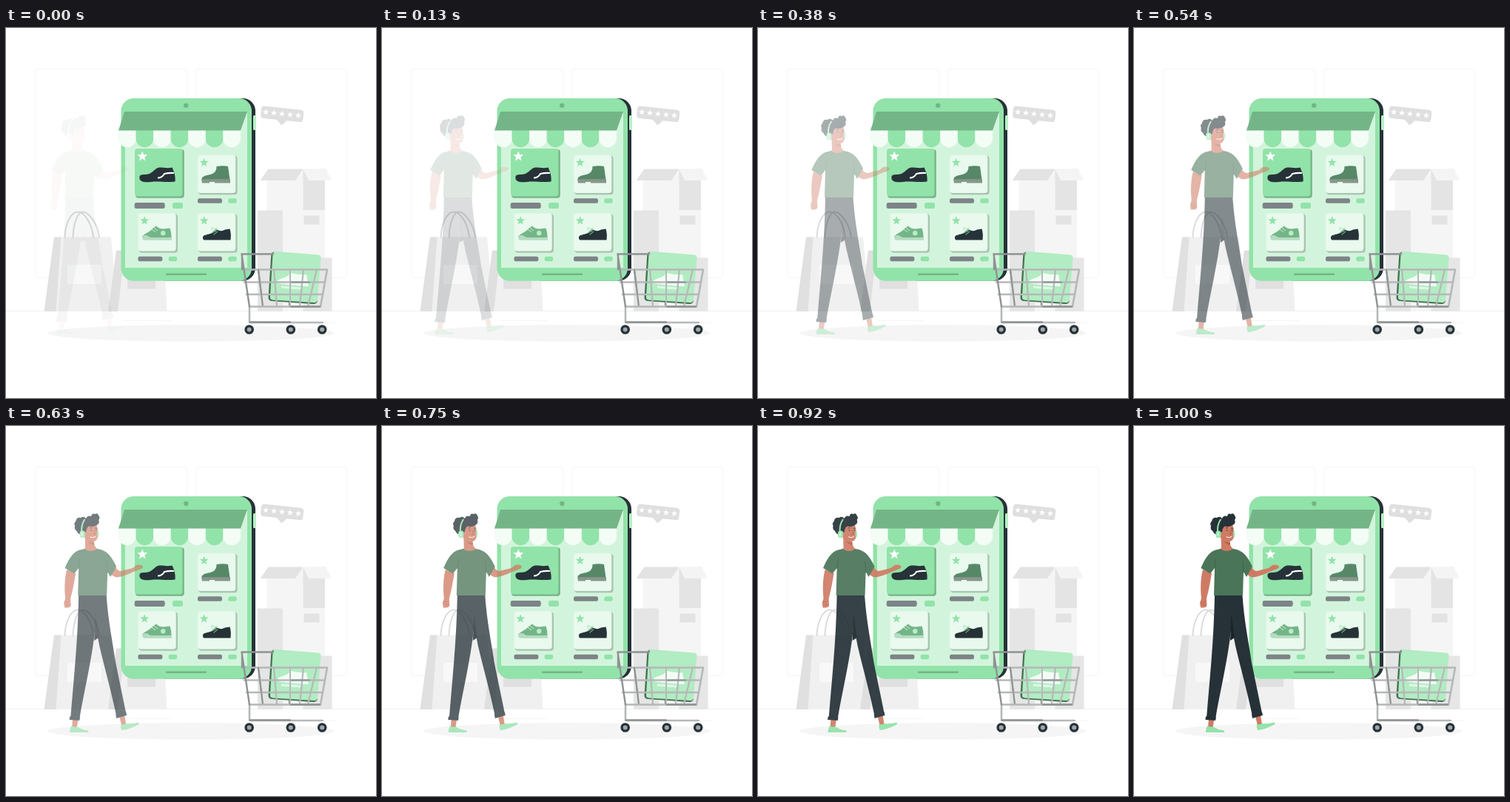
These frames come from a looping animation (500 by 500 pixels, 1.04 s). An HTML page:

```html
<!DOCTYPE html>
<html lang="en">
<head>
<meta charset="utf-8">
<title>Shopping</title>
<style>
html, body { margin: 0; width: 100%; height: 100%; overflow: hidden; background: #fff; }
svg { display: block; width: 100vw; height: 100vh; }
.line { fill: none; stroke-linecap: round; stroke-linejoin: round; }
</style>
</head>
<body>
<svg viewBox="0 0 500 500">
  <defs>
    <path id="star" d="M0-1 .25-.34 .95-.31 .4.13 .59.81 0 .42-.59.81-.4.13-.95-.31-.25-.34Z"/>
  </defs>

  <!-- room -->
  <g fill="none" stroke="#f5f5f5">
    <rect x="39.5" y="55.5" width="205" height="282" rx="3"/>
    <rect x="256.5" y="55.5" width="204" height="282" rx="3"/>
  </g>
  <path d="M0 382.5H500" stroke="#ebebeb" stroke-width=".7"/>
  <path d="M160 395.5H224M420 398.5H447" stroke="#f3f3f3" stroke-width=".8"/>
  <ellipse cx="250" cy="412.4" rx="193.5" ry="11.3" fill="#f5f5f5"/>

  <!-- paper bags -->
  <path d="M74 282.5H142L151 383H67Z" fill="#f0f0f0"/>
  <path d="M65 282.5H74.5L67.5 383H51.5Z" fill="#e0e0e0"/>
  <rect x="83" y="320" width="46" height="26" fill="#f8f8f8"/>
  <path d="M160 300.500H213L217.500 383H150Z" fill="#f0f0f0"/>
  <path d="M149 300.500H160.500L151 383H138Z" fill="#dfdfdf"/>
  <rect x="164" y="330" width="38" height="22.500" fill="#e0e0e0"/>
  <g class="line" stroke="#dcdcdc" stroke-width="2">
    <path d="M79.500 283C80 264 88 248.500 97 248.500S116 264 118 283"/>
    <path d="M90.500 283C91 264 97 248.500 104 248.500S124 264 126 283"/>
  </g>

  <!-- cardboard boxes -->
  <path d="M352.500 206 401 191 431 206V383H352.500Z" fill="#f5f5f5"/>
  <path d="M401.500 192V246H431V206Z" fill="#e4e4e4"/>
  <path d="M354.500 190.500H401.500L391 206H343.500Z" fill="#e3e3e3"/>
  <path d="M401.500 190.500 432 190 440 206H409Z" fill="#f4f4f4"/>
  <rect x="402.500" y="253.500" width="21" height="12" fill="#e3e3e3"/>
  <rect x="340" y="246.500" width="34" height="136.500" fill="#e5e5e5"/>
  <rect x="401.500" y="310.500" width="39" height="72.500" fill="#e6e6e6"/>

  <!-- rating -->
  <g transform="translate(373 116) rotate(6)">
    <rect x="-28.500" y="-8" width="57.500" height="16.500" rx="4" fill="#dfdfdf"/>
    <path d="M-7 8H8L1 15.500Z" fill="#dfdfdf"/>
    <g id="rating"></g>
  </g>

  <!-- tablet -->
  <rect x="200" y="95" width="137" height="246.500" rx="17" fill="#263238"/>
  <rect x="334" y="118" width="4" height="20" rx="1.500" fill="#b7efc6"/>
  <rect x="155.500" y="95" width="176.500" height="246.800" rx="17" fill="#92e3a9"/>
  <rect x="161" y="113" width="165" height="211" fill="#d3f4dc"/>
  <circle cx="243.300" cy="104.800" r="3.200" fill="#73b587"/>
  <path d="M217 332.800H270" class="line" stroke="#73b587" stroke-width="2.400"/>
  <g id="awning"></g>
  <path d="M160 113H326L317 138.500H152Z" fill="#74b587"/>

  <g id="cards"></g>

  <!-- low shoe -->
  <path d="M180.500 201C181 197 187 198.500 192 197.500C198 196 201 190.500 205 189C210 187.500 217 190.500 224.500 188.500C227 194 229.500 200 228.500 207.500C215 209 206 206.500 196 208C187 209 179.500 208 180.500 201Z" fill="#263238"/>
  <path d="M205 202.500Q211 202.500 214 197Q220 195.500 227 196" fill="none" stroke="#fff" stroke-width="2"/>
  <!-- boot -->
  <path d="M284.500 187Q293 185.500 300 187L302.500 205H264.500C264 200.500 270 199 276 198C282 196.500 284.500 193 284.500 187Z" fill="#568867"/>
  <path d="M264 204.300H303V209.500H282V208H275V209.500H265Z" fill="#87978c"/>
  <!-- sneaker -->
  <path d="M184.500 281C188 277.500 194 276 198 271L203 267.500Q207 272 213 271.500L221.500 270.500Q224 277 223.500 284H185Z" fill="#73b587"/>
  <path d="M184 281Q190 278.500 195 283H224V286.800H187Q183.500 286 184 281Z" fill="#b5dcc0"/>
  <circle cx="212.300" cy="277.200" r="3.200" fill="#b9ecc7"/>
  <path d="M197 272 202 276M200 270 205 274" stroke="#d3f4dc"/>
  <!-- ankle shoe -->
  <path d="M266 283C266 279 272 280 277 277.500L284 272Q290 276 296 272.500L302.500 271.500Q304.500 278 303.500 286.500H268Q266 286.500 266 283Z" fill="#263238"/>
  <path d="M278 277 284 274M281 279 286 275M280 274C275 270 279 268 282 272C285 268 287 272 283 274" class="line" stroke="#92e3a9"/>

  <!-- cart -->
  <g class="line" stroke="#8f9394" stroke-width="2.200">
    <path d="M361 305.500 366 326M341 326 347 376M383 326V376"/>
  </g>
  <path d="M362 302.500Q358.500 303 358.300 307L354.500 364Q354.500 368.500 359 369L415 373Q420 373 421 369Z" fill="#427050"/>
  <path d="M365 302 422 306.500Q426 307 425.500 311L421 367Q420.500 371.500 416 371L360.500 367.500Q356.500 367 357 363L360.500 306Q361 302 365 302Z" fill="#b2ecc2"/>
  <path d="M367 341C375 337 380 337 385 331Q397 334 406 333L409 349Q385 348 367 345Z" fill="#f2fcf5"/>
  <path d="M372 350 399 352" stroke="#e1f7e7" stroke-width="3"/>
  <g class="line" stroke="#b5b8b9" stroke-width="2.600">
    <path d="M322 343.500H431M325 360H428"/>
    <path d="M362 326 366 376M402 326 397 376M420 326 408 376" stroke-width="2.200"/>
    <path d="M384 326V376" stroke-width="2"/>
    <path d="M319 326.500H434L425 376.500H329"/>
    <path d="M329 377V398H428"/>
  </g>
  <g class="line" stroke="#8f9394" stroke-width="2.400">
    <path d="M361 305.500H318.500L329 376.500M319 306V326M385 376.500H424M330 397.500H384"/>
    <path d="M341 327 345 360M385 343.500H410" stroke-width="1.800"/>
  </g>
  <g id="wheels"></g>

  <!-- shopper -->
  <g id="shopper">
    <path d="M101 395H108.500L106.500 408H100Z" fill="#cf7b64"/>
    <path d="M164 392 171 391 173 403 167 405Z" fill="#cf7b64"/>
    <path d="M99.500 405Q103 407.500 106.500 406Q113 410.500 122 411.500V414H97Q97 408 99.500 405Z" fill="#92e3a9"/>
    <path d="M166 403Q170 404 173 402Q181 403 190 400.500L190.500 403Q178 410 167 411Q165 407 166 403Z" fill="#92e3a9"/>
    <path d="M126 229H146.500C149 265 155 292 159 320L173 388 160 392C153 358 144 327 137 297L128 250Z" fill="#263238"/>
    <path d="M109 229H140C137 244 133 253 131 276C127 315 116 360 110 396L98 395C102 345 108 290 109 229Z" fill="#263238"/>
    <path d="M131.500 253 130 290 136 286Z" fill="#1b2429"/>
    <path d="M97 392.500 111 393.500 110 398 96.500 397ZM159 389.500 173 386.500 174 391 160 395Z" fill="#263238"/>

    <path d="M93 194 105 199C103 211 101 222 98 233L98.500 243Q97 246 90 245.500L89 239 91 233C89.500 220 90 205 93 194Z" fill="#cf7b64"/>
    <path d="M91 238 96 237.500M92 241.500H97" stroke="#b3634f" stroke-width=".7"/>
    <path d="M150 196 159 191Q162 196 166 196L182 192 187 188Q193 186.500 196 189.500Q196 193 191 194L183 197Q171 203 161 204.500Q154 204 150 196Z" fill="#cf7b64"/>
    <path d="M113 167C102 168 95 181 90.500 192L103 199.500 109 192 108 229H147L148 197 152 204 160 190C154 178 149 168 134 166Q123 163 113 167Z" fill="#4a7558"/>
    <path d="M109 192 111 179M148 198 147 184" class="line" stroke="#3a5f47" stroke-width=".8"/>

    <path d="M117.500 148 130 151 129.500 157Q130 163 134 166Q127 171.500 118 167Z" fill="#cf7b64"/>
    <path d="M121 155Q125 158 130 157V161Q124 160 121 155Z" fill="#b3634f"/>
    <path d="M116 134Q124 129 133 132.500Q136 142 135 150Q133 157 126 156.500Q116 155 115 145Z" fill="#cf7b64"/>
    <g fill="#263238">
      <path d="M113 146Q108 147 106.500 142Q102.500 140 104 135Q102 131 105 129Q106 123 112 124Q116 121 119 125Q121 120 126 122Q127 117 131 119Q135 117 136 121Q138.500 124 136 127Q138 131 134 133.500Q130 137 123 135.500Q120 136 119 143Z"/>
      <circle cx="125.800" cy="141" r=".8"/>
      <circle cx="132.500" cy="141" r=".8"/>
    </g>
    <path d="M124 138 127 137.500M131 138 134 138.500" stroke="#263238" stroke-width=".8"/>
    <path d="M129.500 141 131.500 146 129 146.500" class="line" stroke="#a8563f" stroke-width=".8"/>
    <path d="M125 150Q129 152 132 149.500" class="line" stroke="#fff" stroke-width="1"/>
    <path d="M113.500 145C112 137 114 131 117 126.500" class="line" stroke="#92e3a9" stroke-width="2"/>
    <rect x="110.500" y="141.500" width="7" height="9.500" rx="3" fill="#92e3a9"/>
    <rect x="112" y="143" width="3" height="6.500" rx="1.500" fill="#c2f0ce"/>
    <rect x="134" y="142" width="2.200" height="8" rx="1" fill="#92e3a9"/>
  </g>
</svg>
<script>
const el = id => document.getElementById(id);
const star = (x, y, size, fill) =>
  `<use href="#star" fill="${fill}" transform="translate(${x} ${y}) scale(${size})"/>`;
const box = (x, y, w, h, r, fill) =>
  `<rect x="${x}" y="${y}" width="${w}" height="${h}" rx="${r}" fill="${fill}"/>`;

el('rating').innerHTML = [-2, -1, 0, 1, 2].map(i => star(i * 11, 0, 4.4, '#fff')).join('');

const scallop = 165 / 7;
el('awning').innerHTML = Array.from({ length: 7 }, (_, i) =>
  `<path d="M${152 + i * scallop} 138v11.500a${scallop / 2} 11.800 0 0 0 ${scallop} 0v-11.500z"
    fill="${i % 2 ? '#92e3a9' : '#f4fcf6'}"/>`).join('');

function card(x, y, size, face, shade, mark, starSize) {
  const big = size > 60;
  const labelY = y + size + (big ? 8.5 : 7.3);
  const h = big ? 8 : 6.5;
  const tag = big ? 14 : 11.5;
  return box(x + 1, y + 1, size + 1.3, size + 1.3, 4, shade) +
    box(x, y, size, size, 4, face) +
    star(x + (big ? 10.3 : 8.5), y + (big ? 10.5 : 10), starSize, mark) +
    box(x - .3, labelY, big ? 41 : 33, h, 2.5, '#7d8488') +
    box(x + (big ? 51 : 41), labelY, tag, h, 2.5, '#92e3a9');
}
el('cards').innerHTML =
  card(174, 163, 64.5, '#92e3a9', '#74b587', '#fff', 7.3) +
  [[259.3, 172], [178.7, 250.5], [259.3, 250.5]].map(([x, y]) =>
    card(x, y, 51, '#e9f9ee', '#a9c3b1', '#92e3a9', 6.3)).join('');

el('wheels').innerHTML = [328.7, 384.8, 427.2].map(x =>
  `<circle cx="${x}" cy="407.500" r="6.300" fill="#263238"/>
   <circle cx="${x}" cy="407.500" r="3" fill="#a2a7a9"/>`).join('');

// The shopper slides and fades in at 24 steps a second, on a 10 ms grid.
const LOOP = 1040, STEPS = 25, SLIDE = 30;
const stepStart = i => Math.round(i * 100 / 24) * 10;
const shopper = el('shopper');
const begin = performance.now();

function draw(now) {
  const t = Math.max(0, now - begin) % LOOP;
  let i = STEPS - 1;
  while (i > 0 && stepStart(i) > t) i--;
  const p = (i + 1) / STEPS;
  shopper.setAttribute('opacity', p);
  shopper.setAttribute('transform', `translate(${(p - 1) * SLIDE} 0)`);
  requestAnimationFrame(draw);
}
draw(begin);
</script>
</body>
</html>
```
